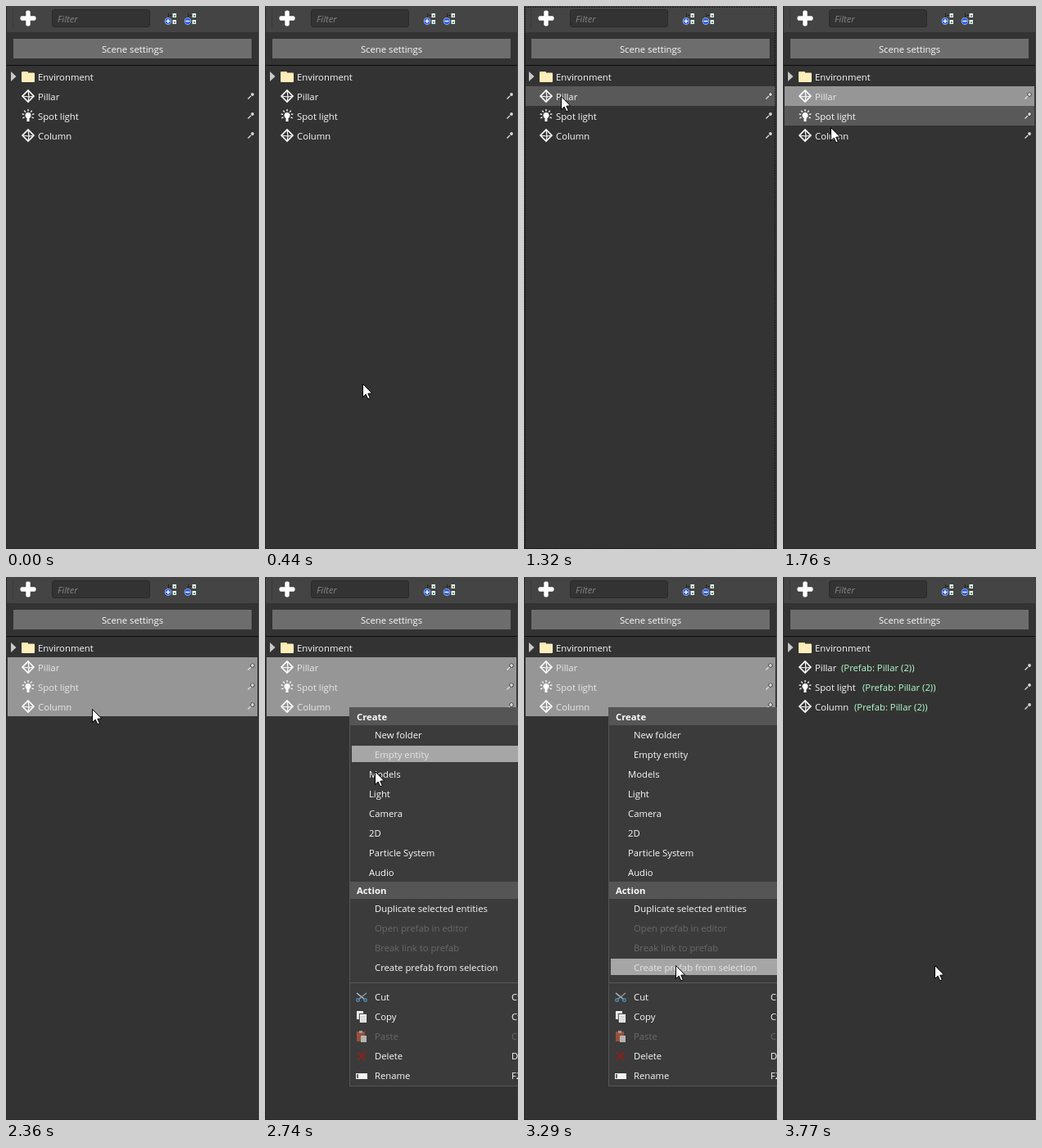
An HTML page with a canvas that plays this animation: 309x663 px, repeating every 4.19 s.

```html
<!DOCTYPE html>
<html lang="en">
<head>
<meta charset="utf-8">
<title>Scene tree</title>
<style>
html, body { margin: 0; width: 100%; height: 100%; overflow: hidden; background: #333; }
canvas { display: block; width: 309px; height: 663px; }
</style>
</head>
<body>
<canvas id="stage"></canvas>
<script>
const W = 309, H = 663, LOOP = 4190;
const canvas = document.getElementById('stage');
const dpr = window.devicePixelRatio || 1;
canvas.width = W * dpr;
canvas.height = H * dpr;
const g = canvas.getContext('2d');
g.scale(dpr, dpr);

const FACE = '11.3px "Open Sans", "Noto Sans", sans-serif';
const FONT = '500 ' + FACE;
const LIGHT = '#fafafa';

// Pointer keys: time, x, y
const KEYS = [
  [240, 198, 652], [760, 40, 223], [1100, 45, 110], [1380, 45, 110],
  [1540, 57, 143], [1740, 57, 143], [1760, 58, 148], [1860, 63, 160],
  [2120, 63, 160], [2360, 105, 161], [2560, 105, 161], [2960, 177, 380],
  [3290, 185, 474], [4190, 185, 474]
];

const ROWS = [
  { name: 'Pillar', y: 98, icon: entityIcon, pick: 1380, tagX: 71 },
  { name: 'Spot light', y: 122, icon: bulbIcon, pick: 1780, tagX: 97 },
  { name: 'Column', y: 146, icon: entityIcon, pick: 2130, tagX: 87 }
];
const MENU_OPEN = 2500, MENU_CLOSE = 3610, DONE = 3770;

const MENU = [
  { name: 'New folder', x: 134, y: 193 },
  { name: 'Empty entity', x: 134, y: 217 },
  { name: 'Models', x: 127, y: 241 },
  { name: 'Light', x: 127, y: 265 },
  { name: 'Camera', x: 127, y: 289 },
  { name: '2D', x: 127, y: 313 },
  { name: 'Particle System', x: 127, y: 337 },
  { name: 'Audio', x: 127, y: 361 },
  { name: 'Duplicate selected entities', x: 134, y: 405 },
  { name: 'Open prefab in editor', x: 134, y: 429, off: true },
  { name: 'Break link to prefab', x: 134, y: 453, off: true },
  { name: 'Create prefab from selection', x: 134, y: 477 },
  { name: 'Cut', x: 134, y: 513, key: 'Ctrl+X', icon: cutIcon },
  { name: 'Copy', x: 134, y: 537, key: 'Ctrl+C', icon: copyIcon },
  { name: 'Paste', x: 134, y: 561, key: 'Ctrl+V', icon: pasteIcon, off: true },
  { name: 'Delete', x: 134, y: 585, key: 'Del', icon: deleteIcon },
  { name: 'Rename', x: 134, y: 609, key: 'F2', icon: renameIcon }
];

function rect(x, y, w, h, color) {
  g.fillStyle = color;
  g.fillRect(x, y, w, h);
}

function text(s, x, y, color = LIGHT, font = FONT) {
  g.font = font;
  g.fillStyle = color;
  g.fillText(s, x, y);
}

function trace(points, close) {
  g.beginPath();
  points.forEach(([x, y]) => g.lineTo(x, y));
  if (close) g.closePath();
}

function line(points, color, width = 1) {
  trace(points);
  g.strokeStyle = color;
  g.lineWidth = width;
  g.stroke();
}

function fill(points, color) {
  trace(points, true);
  g.fillStyle = color;
  g.fill();
}

function disc(x, y, r, color) {
  g.beginPath();
  g.arc(x, y, r, 0, Math.PI * 2);
  g.fillStyle = color;
  g.fill();
}

function ring(x, y, r, color, width = 1) {
  g.beginPath();
  g.arc(x, y, r, 0, Math.PI * 2);
  g.strokeStyle = color;
  g.lineWidth = width;
  g.stroke();
}

function box(x, y, w, h, r, color) {
  g.beginPath();
  g.roundRect(x, y, w, h, r);
  g.fillStyle = color;
  g.fill();
}

// Monotone cubic through the keys, so the pointer flows without overshoot
function slope(i, axis) {
  const sec = j => (KEYS[j + 1][axis] - KEYS[j][axis]) / (KEYS[j + 1][0] - KEYS[j][0]);
  if (i === 0) return sec(0) * 1.15;
  if (i === KEYS.length - 1) return 0;
  const a = sec(i - 1), b = sec(i);
  return a * b <= 0 ? 0 : 2 * a * b / (a + b);
}

function pointer(t) {
  t = Math.floor(t / 20) * 20;
  if (t < KEYS[0][0]) return null;
  let i = 0;
  while (i < KEYS.length - 2 && t >= KEYS[i + 1][0]) i++;
  const a = KEYS[i], b = KEYS[i + 1];
  const d = b[0] - a[0], u = (t - a[0]) / d, v = 1 - u;
  const [x, y] = [1, 2].map(k =>
    (1 + 2 * u) * v * v * a[k] + u * v * v * d * slope(i, k) +
    u * u * (3 - 2 * u) * b[k] - u * u * v * d * slope(i + 1, k));
  return { x: Math.round(x), y: Math.round(y) };
}

function entityIcon(x, y) {
  const top = [x, y - 7], right = [x + 7, y], low = [x, y + 7], left = [x - 7, y];
  const mid = [x + 1, y + 1];
  line([top, right, low, left, top, right], '#fff', 1.6);
  line([left, mid, right], '#fff', 1.2);
  line([top, mid, low], '#fff', 1.2);
}

function bulbIcon(x, y) {
  disc(x, y - 0.5, 3.5, '#fff');
  rect(x - 1.5, y + 2, 3, 5, '#fff');
  for (let k = 0; k < 7; k++) {
    const a = Math.PI * (0.85 + k * 1.3 / 6);
    const c = Math.cos(a), s = Math.sin(a);
    line([[x + 5 * c, y - 0.5 + 5 * s], [x + 7.5 * c, y - 0.5 + 7.5 * s]], '#fff', 1.3);
  }
}

function pinIcon(y) {
  line([[295.5, y + 3.5], [299.5, y - 0.5]], '#e0e0e0', 1.2);
  disc(301, y - 2, 2.6, '#2c2c2c');
  disc(301, y - 2, 1.9, '#d8d8d8');
}

function cutIcon(x, y) {
  line([[x - 6, y - 5], [x + 4, y + 3]], '#b9c4cc', 1.4);
  line([[x + 6, y - 5], [x - 4, y + 3]], '#8d9aa3', 1.4);
  ring(x - 4.5, y + 3.5, 1.8, '#4d83ad', 1.4);
  ring(x + 4.5, y + 3.5, 1.8, '#4d83ad', 1.4);
}

function page(x, y, w, h) {
  rect(x, y, w, h, '#f4f4f4');
  for (let k = 2; k < h - 1; k += 2) rect(x + 1, y + k, w - 2, 0.6, '#aab2bb');
}

function copyIcon(x, y) {
  page(x - 6, y - 7, 8, 10);
  rect(x - 3, y - 4, 9, 11, '#555');
  page(x - 2, y - 3, 8, 10);
}

function pasteIcon(x, y) {
  rect(x - 6, y - 6, 10, 12, '#9a4f3a');
  rect(x - 3, y - 7, 4, 3, '#999');
  rect(x - 1, y - 1, 7, 8, '#b5b5b5');
}

function deleteIcon(x, y) {
  line([[x - 5, y - 5], [x + 5, y + 5]], '#8e1f19', 1.8);
  line([[x + 5, y - 5], [x - 5, y + 5]], '#8e1f19', 1.8);
}

function renameIcon(x, y) {
  rect(x - 7, y - 3, 14, 7, '#f2f2f2');
  rect(x - 6, y - 2, 2, 5, '#666');
}

function treeIcon(x, plus) {
  line([[x + 0.5, 9], [x + 0.5, 14]], '#222');
  for (const y of [9, 17]) {
    line([[x + 2, y + 2.5], [x + 5, y + 2.5]], '#222');
    rect(x + 5.5, y, 4.5, 5, '#eef4f0');
    rect(x + 7, y + 2, 2, 2, '#4c9c80');
  }
  disc(x, 18.5, 4.2, '#dfe8fb');
  disc(x, 18.5, 3.7, '#2c5fe0');
  rect(x - 2.5, 17.8, 5, 1.4, '#fff');
  if (plus) rect(x - 0.7, 16, 1.4, 5, '#fff');
}

function drawPanel() {
  rect(0, 0, W, H, '#333333');
  rect(0, 0, W, 32, '#444444');
  rect(8, 4, 1, 23, '#3a3a3a');

  box(17.5, 12.3, 19, 5.4, 2, '#fff');
  box(24.3, 5.5, 5.4, 19, 2, '#fff');

  box(56, 4, 120, 22, 4, '#292929');
  box(57, 5, 118, 20, 3, '#333333');
  text('Filter', 63, 20, '#848484', 'italic ' + FACE);
  treeIcon(198, true);
  treeIcon(222, false);

  rect(9, 40, 291, 24, '#6d6d6d');
  g.textAlign = 'center';
  text('Scene settings', 154.5, 57);
  g.textAlign = 'left';
  rect(0, 72, W, 1, '#0c0c0c');

  fill([[6, 80], [12.5, 86], [6, 92]], '#c8c8c8');
  box(19, 80, 8, 5, 1, '#f5dfa0');
  box(19, 81.5, 16, 11.5, 1, '#fdeebb');
  text('Environment', 39, 91);
}

function drawRows(t, hot) {
  for (const row of ROWS) {
    const picked = t >= row.pick && t < DONE;
    const hovered = t < MENU_OPEN && hot && hot.y >= row.y && hot.y < row.y + 24;
    if (picked) rect(2, row.y, 305, 24, '#969696');
    else if (hovered) rect(2, row.y, 305, 24, '#595959');
    row.icon(27, row.y + 12);
    text(row.name, 39, row.y + 17, picked ? '#e8e8e8' : LIGHT);
    if (t >= DONE) text('(Prefab: Pillar (2))', row.tagX, row.y + 17, '#b4ffcf');
    pinIcon(row.y + 12);
  }
}

function drawEdges(t) {
  rect(0, 0, 1, H, '#292929');
  rect(308, 0, 1, H, '#3f3f3f');
  rect(0, 662, W, 1, '#2b2b2b');
  if (t >= 1320 && t < 1380) {
    g.setLineDash([1, 2]);
    g.strokeStyle = '#000';
    g.lineWidth = 1;
    g.strokeRect(1.5, 1.5, 305, 661);
    g.setLineDash([]);
  }
}

function drawMenu(hot) {
  rect(103, 159, 206, 463, '#555555');
  rect(104, 160, 205, 461, '#3b3b3b');
  for (const [name, y] of [['Create', 160], ['Action', 372]]) {
    rect(104, y, 205, 21, '#555555');
    text(name, 112, y + 15, LIGHT, 'bold ' + FACE);
  }
  rect(104, 495, 205, 1, '#5a5a5a');
  for (const m of MENU) {
    const on = !m.off && hot && Math.abs(hot.y - m.y) < 12 && Math.abs(hot.y - 383) > 10;
    if (on) rect(106, m.y - 11, 203, 20, '#a6a6a6');
    const color = m.off ? '#696969' : on ? '#e4e4e4' : LIGHT;
    if (m.icon) m.icon(118, m.y);
    text(m.name, m.x, m.y + 4, color);
    if (m.key) text(m.key, 301, m.y + 4, color);
  }
}

function drawPointer({ x, y }) {
  const shape = [[0, 0], [0, 16], [3.7, 12.6], [6.3, 18.3], [8.8, 17.2], [6.3, 11.7], [11.2, 11.4]];
  trace(shape.map(([a, b]) => [x + 0.5 + a, y + 0.5 + b]), true);
  g.fillStyle = '#fff';
  g.fill();
  g.strokeStyle = '#000';
  g.lineWidth = 1;
  g.stroke();
}

function frame() {
  const t = performance.now() % LOOP;
  const hot = pointer(t - 40); // hover trails the pointer
  drawPanel();
  drawRows(t, hot);
  drawEdges(t);
  if (t >= MENU_OPEN && t < MENU_CLOSE) drawMenu(hot);
  const p = pointer(t);
  if (p) drawPointer(p);
  requestAnimationFrame(frame);
}
frame();
</script>
</body>
</html>
```
